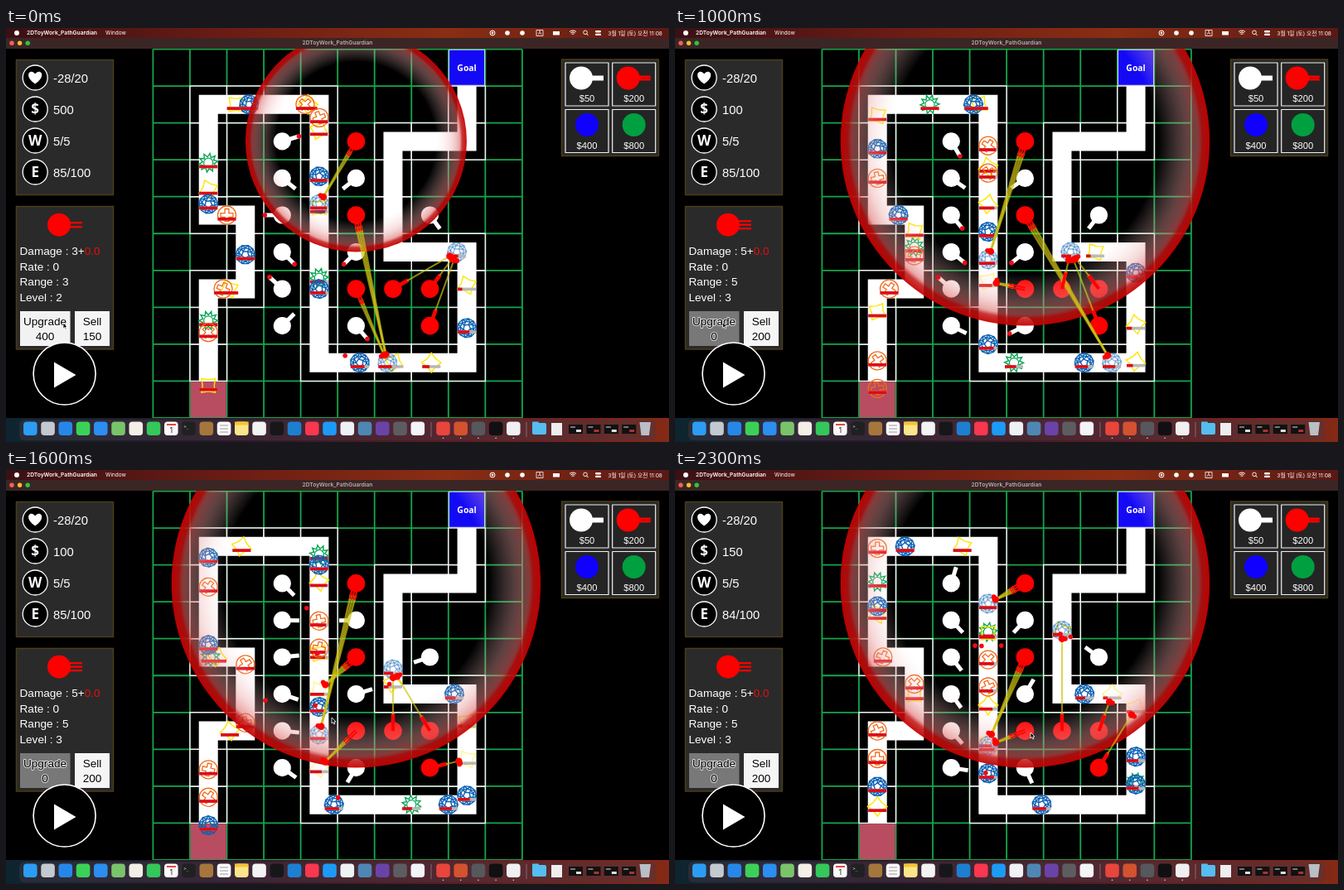
These frames come from a looping animation (800 by 500 pixels, 2400 ms). An HTML page with a canvas:

```html
<!DOCTYPE html>
<html lang="ko">
<head>
<meta charset="utf-8">
<title>Tower game</title>
<style>
html, body { margin: 0; width: 100%; height: 100%; overflow: hidden; background: #000; }
canvas { display: block; width: 800px; height: 500px; }
</style>
</head>
<body>
<canvas id="stage" width="800" height="500"></canvas>
<script>
const g = document.getElementById('stage').getContext('2d');
const SANS = '"Liberation Sans", Arial, sans-serif';
const UI = 'Inter, "Noto Sans CJK KR", sans-serif';
const BOLD = '"Open Sans", sans-serif';
const APP = '2DToyWork_PathGuardian';
const CELL = 44.55, LEFT = 177.4, TOP = 25.5, STEP = 100, STEPS = 24, WARMUP = -8;
const UPGRADE = 5, KILL = 21, VICTIM = 'yellow4';
const RED = '#f00';

const center = (c, r) => [LEFT + (c + .5) * CELL, TOP + (r + .5) * CELL];
const mod = (a, n) => (a % n + n) % n;
const clamp = (v, lo, hi) => Math.min(hi, Math.max(lo, v));
const corners = [[1, 9], [1, 6], [2, 6], [2, 4], [1, 4], [1, 1], [4, 1], [4, 8],
  [8, 8], [8, 5], [6, 5], [6, 2], [8, 2], [8, 0]];

// Walks the route; distance is counted in cells.
function along(s) {
  for (let i = 1; i < corners.length; i++) {
    const [a, b] = corners[i - 1], [c, d] = corners[i];
    const len = Math.abs(c - a) + Math.abs(d - b);
    if (s <= len) return [a + (c - a) * s / len, b + (d - b) * s / len];
    s -= len;
  }
  return corners[corners.length - 1];
}

// Each wave: speed in cells per step, health lost per cell under fire, starting distances.
const waves = {
  green: { color: '#00a651', speed: .3, frail: .05, from: [8.42, 17.7, 2.14] },
  yellow: { color: '#ffe600', speed: .2, frail: .06,
    from: [10.75, 7.7, 12.7, 13.7, 15.8, 26.1, 23.04, 22.03, .38, 3.56, -3.65] },
  orange: { color: '#f26a1b', speed: .15, frail: .06,
    from: [12.62, 13.36, 6.5, 3.4, 1.82, -.45, -1.2] },
  blue: { color: '#0d62b4', speed: .15, frail: .03,
    from: [11.1, 7.3, 4.93, 14.95, 15.7, 18, 21.1, 21.85, 24.94, 27.27, -1.96] }
};
const mobs = Object.entries(waves).flatMap(([kind, w]) =>
  w.from.map((start, i) => ({ ...w, kind, i, start, id: kind + i })));

const travelled = (m, f) => m.start + m.speed * f;
const place = (m, f) => center(...along(travelled(m, f)));
const alive = (m, f) => travelled(m, f) >= 0 && !(m.id === VICTIM && f >= KILL);
const gap = (t, m, f) => {
  const [x, y] = place(m, f);
  return Math.hypot(x - t.x, y - t.y) / CELL;
};

// A tower keeps its target until it dies or leaves, then takes the nearest one.
function track(t, start, first) {
  const inReach = (m, f) => alive(m, f) && gap(t, m, f) <= t.reach(f);
  t.target = {}; t.angle = {};
  let aim = first, angle = 0;
  for (let f = start; f < STEPS; f++) {
    if (!aim || !inReach(aim, f))
      aim = mobs.filter(m => inReach(m, f)).sort((a, b) => gap(t, a, f) - gap(t, b, f))[0];
    if (aim) {
      const [x, y] = place(aim, f);
      angle = Math.atan2(y - t.y, x - t.x);
    }
    t.target[f] = aim; t.angle[f] = angle;
  }
  return t;
}

// White towers: column, row, firing phase.
const guns = [[3, 2, 0], [3, 3, 2], [3, 4, 0], [3, 5, 0], [3, 6, 0], [3, 7, 2],
  [5, 3, 2], [5, 5, 0], [5, 7, 0], [7, 4, 2]].map(([c, r, phase]) => {
  const [x, y] = center(c, r);
  return track({ x, y, phase, reach: () => 2 }, WARMUP);
});

// Laser towers: column, row, level, first target.
const REACH = [0, 2.8, 3, 4.85];
const lasers = [[5, 2, 2, 'blue4'], [5, 4, 3, 'blue7'], [5, 6, 2, 'blue7'],
  [6, 6, 1, 'blue9'], [7, 6, 1, 'blue9'], [7, 7, 1, 'blue9']].map(([c, r, level, first], i) => {
  const [x, y] = center(c, r);
  const rank = f => i === 0 && f >= UPGRADE ? 3 : level;
  return track({ x, y, rank, reach: f => REACH[rank(f)] }, 0, mobs.find(m => m.id === first));
});

function box(x, y, w, h, fill, stroke, lw = 1) {
  if (fill) { g.fillStyle = fill; g.fillRect(x, y, w, h); }
  if (stroke) { g.strokeStyle = stroke; g.lineWidth = lw; g.strokeRect(x, y, w, h); }
}
function round(x, y, w, h, r, fill) {
  g.beginPath(); g.roundRect(x, y, w, h, r); g.fillStyle = fill; g.fill();
}
function disc(x, y, r, fill, stroke, lw = 1) {
  g.beginPath(); g.arc(x, y, r, 0, 7);
  if (fill) { g.fillStyle = fill; g.fill(); }
  if (stroke) { g.strokeStyle = stroke; g.lineWidth = lw; g.stroke(); }
}
function line(x1, y1, x2, y2, color, lw) {
  g.strokeStyle = color; g.lineWidth = lw;
  g.beginPath(); g.moveTo(x1, y1); g.lineTo(x2, y2); g.stroke();
}
function text(s, x, y, font, fill = '#fff', align = 'left') {
  g.font = font; g.textAlign = align; g.textBaseline = 'alphabetic';
  g.fillStyle = fill; g.fillText(s, x, y);
}
function shape(points, fill) {
  g.beginPath();
  points.forEach(p => g.lineTo(...p));
  g.closePath();
  if (fill) { g.fillStyle = fill; g.fill(); } else g.stroke();
}
function fade(x0, x1, ...colors) {
  const gradient = g.createLinearGradient(x0, 0, x1, 0);
  colors.forEach((c, i) => gradient.addColorStop(i / (colors.length - 1), c));
  return gradient;
}
// Ring of vertices whose radii alternate through the given list.
function ring(n, radii, turn = 0) {
  return Array.from({ length: n }, (_, i) => {
    const a = turn + i * 2 * Math.PI / n, r = radii[i % radii.length];
    return [r * Math.cos(a), r * Math.sin(a)];
  });
}

const bodies = {
  blue() {
    const outer = ring(10, [11.5]), mid = ring(10, [8], .314), inner = ring(5, [4.5], .314);
    shape(outer); shape(mid); shape(inner);
    g.beginPath();
    mid.forEach((p, i) => {
      g.moveTo(...outer[i]); g.lineTo(...p); g.lineTo(...outer[(i + 1) % 10]);
      g.moveTo(...p); g.lineTo(...inner[i >> 1]);
    });
    g.stroke();
  },
  orange() {
    disc(0, 0, 11, null, g.strokeStyle, 1.3);
    const a = 2.4, b = 7.5;
    shape([[-a, -b], [a, -b], [a, -a], [b, -a], [b, a], [a, a], [a, b], [-a, b],
      [-a, a], [-b, a], [-b, -a], [-a, -a]]);
  },
  yellow() { shape(ring(8, [11.8, 7])); },
  green() { shape(ring(20, [11.5, 7])); disc(0, 0, 5.6, null, g.strokeStyle, 1.2); }
};

function enemies(f) {
  const aimed = new Set(lasers.map(t => t.target[f]));
  for (const m of mobs.filter(m => alive(m, f))) {
    const health = clamp(1 - m.frail * (travelled(m, f) - 13), .25, 1);
    g.save();
    g.translate(...place(m, f));
    g.save();
    if (aimed.has(m)) g.globalAlpha = .45;
    g.rotate(f * .1366 + (m.i * 5 + 6) % 8 * Math.PI / 8);
    g.strokeStyle = m.color; g.lineWidth = 1.4;
    bodies[m.kind]();
    g.restore();
    box(-11, 3, 22, 3.6, '#b8b8b8');
    box(-11, 3, 22 * health, 3.6, '#e00a14');
    g.restore();
  }
}

function board() {
  for (let i = 0; i <= 10; i++) {
    const x = LEFT + i * CELL, y = TOP + i * CELL;
    line(x, TOP, x, TOP + 10 * CELL, '#14a64b', 1.8);
    line(LEFT, y, LEFT + 10 * CELL, y, '#14a64b', 1.8);
  }
  for (let s = 1; s < 36; s++) {
    const [c, r] = along(s);
    box(LEFT + c * CELL, TOP + r * CELL, CELL, CELL, '#000', '#eef5f0', 1.5);
  }
  box(LEFT + CELL + .7, TOP + 9 * CELL + .7, CELL - 1.4, CELL - 1.4, '#b84d62');
  g.strokeStyle = '#fff'; g.lineWidth = 23; g.lineJoin = 'miter';
  g.beginPath();
  g.moveTo(...center(1, 8.5));
  corners.slice(1).forEach(p => g.lineTo(...center(...p)));
  g.stroke();
  const [x, y] = center(8, 0);
  box(x - 21.5, y - 21.5, 43, 43, '#1409f5', '#d8dcf8', 1);
  text('Goal', x, y + 4, 'bold 10.4px ' + BOLD, '#fff', 'center');
}

function barrel(x, y, angle, n, color, len, width, space = 3) {
  g.save();
  g.translate(x, y); g.rotate(angle);
  for (let k = 0; k < n; k++) {
    const o = (k - (n - 1) / 2) * space;
    line(0, o, len, o, color, width);
  }
  g.restore();
}

function towers(f) {
  for (const t of guns) {
    barrel(t.x, t.y, t.angle[f], 1, '#fff', 20.5, 5);
    disc(t.x, t.y, 10.6, '#fff');
  }
  for (const t of lasers) {
    const n = t.rank(f);
    barrel(t.x, t.y, t.angle[f], n, RED, 21, n > 1 ? 2 : 4.5);
    disc(t.x, t.y, 10.8, RED);
  }
}

function beams(f) {
  for (const t of lasers) {
    if (!t.target[f]) continue;
    const n = t.rank(f), angle = t.angle[f], [tx, ty] = place(t.target[f], f);
    const cos = Math.cos(angle), sin = Math.sin(angle);
    const x = tx - 10 * cos, y = ty - 10 * sin;
    for (let k = 0; k < n; k++) {
      const o = (k - (n - 1) / 2) * 3;
      line(t.x + 14 * cos - o * sin, t.y + 14 * sin + o * cos, x, y,
        'rgba(205,195,20,.7)', n > 1 ? 2.6 : 2);
    }
    barrel(t.x, t.y, angle, n, RED, 20, n > 1 ? 1.8 : 4);
    disc(x, y, 4.2, RED);
    disc(x - 4 * sin, y + 4 * cos, 2.8, RED);
  }
}

// Every gun fires once in five steps; the shot homes in on its target.
function bullets(f) {
  for (const t of guns) {
    const age = mod(f - t.phase, 5), m = t.target[f - age];
    if (!m || !alive(m, f)) continue;
    const [x, y] = place(m, f), d = Math.hypot(x - t.x, y - t.y), p = (21 + 21 * age) / d;
    if (p < 1) disc(t.x + (x - t.x) * p, t.y + (y - t.y) * p, 2.8, '#f00a14');
  }
}

function range(f) {
  const [x, y] = center(5, 2), r = f < UPGRADE ? 133.5 : 222.7;
  const glow = g.createRadialGradient(x, y, 0, x, y, r);
  glow.addColorStop(.72, 'rgba(255,225,225,0)');
  glow.addColorStop(.87, 'rgba(232,160,160,.4)');
  glow.addColorStop(.935, 'rgba(220,105,105,.58)');
  glow.addColorStop(.96, 'rgba(190,20,20,.85)');
  glow.addColorStop(1, 'rgba(200,0,0,.95)');
  disc(x, y, r, glow);
}

function sample(x, y, r, color, n, len) {
  barrel(x, y, 0, n, color, len, n > 1 ? 2.2 : 6, n > 2 ? 4.5 : 5);
  disc(x, y, r, color);
}

const panel = (x, y, w, h) => box(x, y, w, h, '#2a2a2a', '#4b3c16', 1.5);

function stats(f) {
  panel(12.5, 38.5, 117, 163);
  const rows = ['-28/20', f < UPGRADE ? '500' : f < KILL ? '100' : '150', '5/5',
    f < KILL ? '85/100' : '84/100'];
  rows.forEach((s, i) => {
    const y = 60 + 38 * i;
    disc(35.2, y, 15, '#000', '#fff', 1.3);
    if (i) text(' $WE'[i], 35.2, y + 6, 'bold 17px ' + BOLD, '#fff', 'center');
    text(s, 57, y + 5.6, '14.8px ' + SANS);
  });
  g.fillStyle = '#fff';
  g.beginPath();
  g.moveTo(35.2, 67.5);
  g.bezierCurveTo(20, 57, 30, 48, 35.2, 55.5);
  g.bezierCurveTo(40.4, 48, 50.4, 57, 35.2, 67.5);
  g.fill();
}

function details(f) {
  const up = f >= UPGRADE, font = '13.6px ' + SANS;
  panel(12.5, 215.5, 117, 172.5);
  sample(64, 237.7, 14, RED, up ? 3 : 2, 28);
  const lines = [`Damage : ${up ? 5 : 3}+`, 'Rate : 0', `Range : ${up ? 5 : 3}`, `Level : ${up ? 3 : 2}`];
  lines.forEach((s, i) => text(s, 16.5, 273.8 + 18.8 * i, font));
  text('0.0', 16.5 + g.measureText(lines[0]).width, 273.8, font, '#e01010');

  box(17, 342, 60.5, 42, up ? '#787878' : f < 3 ? '#f2f2f2' : '#c8c8c8');
  box(83, 342, 42, 42, '#f5f5f5');
  const label = (s, x, y) => {
    g.font = font; g.textAlign = 'center'; g.lineJoin = 'round';
    g.strokeStyle = 'rgba(255,255,255,.75)'; g.lineWidth = 2;
    g.strokeText(s, x, y);
    text(s, x, y, font, '#000', 'center');
  };
  label('Upgrade', 47, 359); label(up ? '0' : '400', 47, 377);
  label('Sell', 104, 359); label(up ? '200' : '150', 104, 377);

  disc(70.6, 417.5, 37.5, '#000', '#fff', 1.6);
  shape([[58, 403.5], [84.5, 419], [58, 434.5]], '#fff');
}

function shop() {
  panel(670.5, 38, 117, 116.5);
  ['$50', '$200', '$400', '$800'].forEach((price, i) => {
    const x = 675 + i % 2 * 56.7, y = 42 + (i >> 1) * 56.5;
    box(x, y, 52, 52, '#242424', '#f0f0f0', 1.2);
    if (i < 2) sample(x + 19, y + 18.5, 14, i ? RED : '#fff', 1, 27);
    else disc(x + 26, y + 18.5, 14, i === 2 ? '#1000ff' : '#00a040');
    if (i === 1) line(x + 34, y + 18.5, x + 45, y + 18.5, '#a80000', 1);
    text(price, x + 26, y + 47, '11.2px ' + SANS, '#fff', 'center');
  });
}

function menuBar() {
  box(0, 0, 800, 12, fade(0, 800, '#3a1014', '#6a1c14', '#8a2e14', '#5a1814'));
  box(0, 12, 800, 13, '#3b2625');
  disc(13, 6, 3, '#fff');
  text(APP, 25, 8.4, '600 6.7px ' + UI);
  text('Window', 120, 8.4, '6.5px ' + UI);
  text(APP, 400, 20.4, '600 6.7px ' + UI, '#b9aeae', 'center');
  ['#ff5f57', '#febc2e', '#28c840'].forEach((c, i) => disc(7 + i * 9.6, 18.3, 2.7, c));
  text('3월 1일 (토) 오전 11:08', 792, 8.6, '6.7px ' + UI, '#fff', 'right');
  disc(587, 6, 3, null, '#fff', 1); disc(587, 6, 1.4, '#fff');
  disc(605, 6, 2.8, '#fff');
  disc(623, 6, 2.8, '#fff');
  box(640, 2.5, 8, 7, null, '#fff', .8);
  text('A', 644, 8.2, '6px ' + UI, '#fff', 'center');
  box(660, 4, 8, 4.5, '#fff');
  g.strokeStyle = '#fff'; g.lineWidth = 1;
  [2, 4, 6].forEach(r => { g.beginPath(); g.arc(684, 9, r, -2.3, -.84); g.stroke(); });
  disc(699, 5.3, 2.3, null, '#fff', .9); line(700.7, 7, 702.5, 9, '#fff', 1);
  round(711, 3, 7, 2.4, 1.2, '#fff'); round(711, 6.7, 7, 2.4, 1.2, '#fff');
}

function dock() {
  box(0, 471, 800, 29, fade(0, 800, '#0d2530', '#2a1a2a', '#5a1c22', '#842a16'));
  round(16, 473, 768, 25, 6, 'rgba(75,55,68,.45)');
  const colors = ['#2b9df4', '#c4c9d0', '#2787e8', '#3bd158', '#2b8ef0', '#79c46b', '#f3eee6',
    '#34c759', '#fafafa', '#202022', '#a5773c', '#fbfbfb', '#fbe58a', '#f3f3f3', '#17171a',
    '#1d7fd0', '#f9374f', '#1c9bf6', '#eef2f5', '#4f87b4', '#6a43a8', '#5d5d61', '#f2f4f8'];
  const apps = ['#e8453c', '#d35230', '#55585c', '#101012', '#f0f0f2'];
  const icon = (x, c) => round(x - 8.3, 475.5, 16.6, 16.6, 4, c);
  colors.forEach((c, i) => icon(29.3 + i * 21.25, c));
  apps.forEach((c, i) => {
    icon(527.5 + i * 21.2, c);
    disc(527.5 + i * 21.2, 495.2, .8, '#ddd');
  });
  text('1', 199.3, 489, '9px ' + UI, '#222', 'center');
  box(194, 478, 11, 2, '#e8453c');
  text('>_', 214.5, 483, '5px "DejaVu Sans Mono", monospace');
  box(276, 475.5, 16.6, 4, '#f4c531');
  for (let i = 0; i < 3; i++) line(258, 480 + i * 4, 268, 480 + i * 4, '#999', 1);
  [513, 628].forEach(x => line(x, 476, x, 494, 'rgba(255,255,255,.3)', 1));
  round(635, 477, 17, 14, 2, '#55bdf0');
  round(635, 475.5, 8, 4, 1, '#55bdf0');
  box(658, 477, 13, 15, '#eee');
  for (let i = 0; i < 4; i++) {
    const x = 679 + i * 21.4;
    box(x, 479, 17, 11, '#111');
    box(x + 2, 481, 6, 2, '#777');
    box(x + 9, 485, 6, 3, i % 2 ? '#a33' : '#ddd');
  }
  shape([[764.5, 476], [778, 476], [776, 492], [766.5, 492]], '#b9bfc6');
}

// Pointer stops: step, x, y.
const stops = [[0, 69, 356], [4, 70, 356], [7, 57, 356], [12, 58, 355],
  [16, 393, 299], [19, 489, 261], [23, 429, 317]];

function cursor(f) {
  const i = Math.max(1, stops.findIndex(s => f <= s[0]));
  const [a, x0, y0] = stops[i - 1], [b, x1, y1] = stops[i], p = (f - a) / (b - a);
  g.save();
  g.translate(x0 + (x1 - x0) * p, y0 + (y1 - y0) * p);
  const arrow = [[0, 0], [0, 7], [1.7, 5.5], [2.8, 8], [4, 7.5], [2.9, 5], [5, 5]];
  shape(arrow, '#000');
  g.strokeStyle = '#fff'; g.lineWidth = .8;
  shape(arrow);
  g.restore();
}

function draw(f) {
  box(0, 0, 800, 500, '#000');
  g.save();
  g.beginPath(); g.rect(0, 25, 800, 446); g.clip();
  board();
  towers(f);
  enemies(f);
  range(f);
  beams(f);
  bullets(f);
  g.restore();
  stats(f);
  details(f);
  shop();
  menuBar();
  dock();
  cursor(f);
}

let shown = -1;
function tick() {
  const f = Math.floor(performance.now() / STEP) % STEPS;
  if (f !== shown) draw(shown = f);
  requestAnimationFrame(tick);
}
tick();
</script>
</body>
</html>
```
